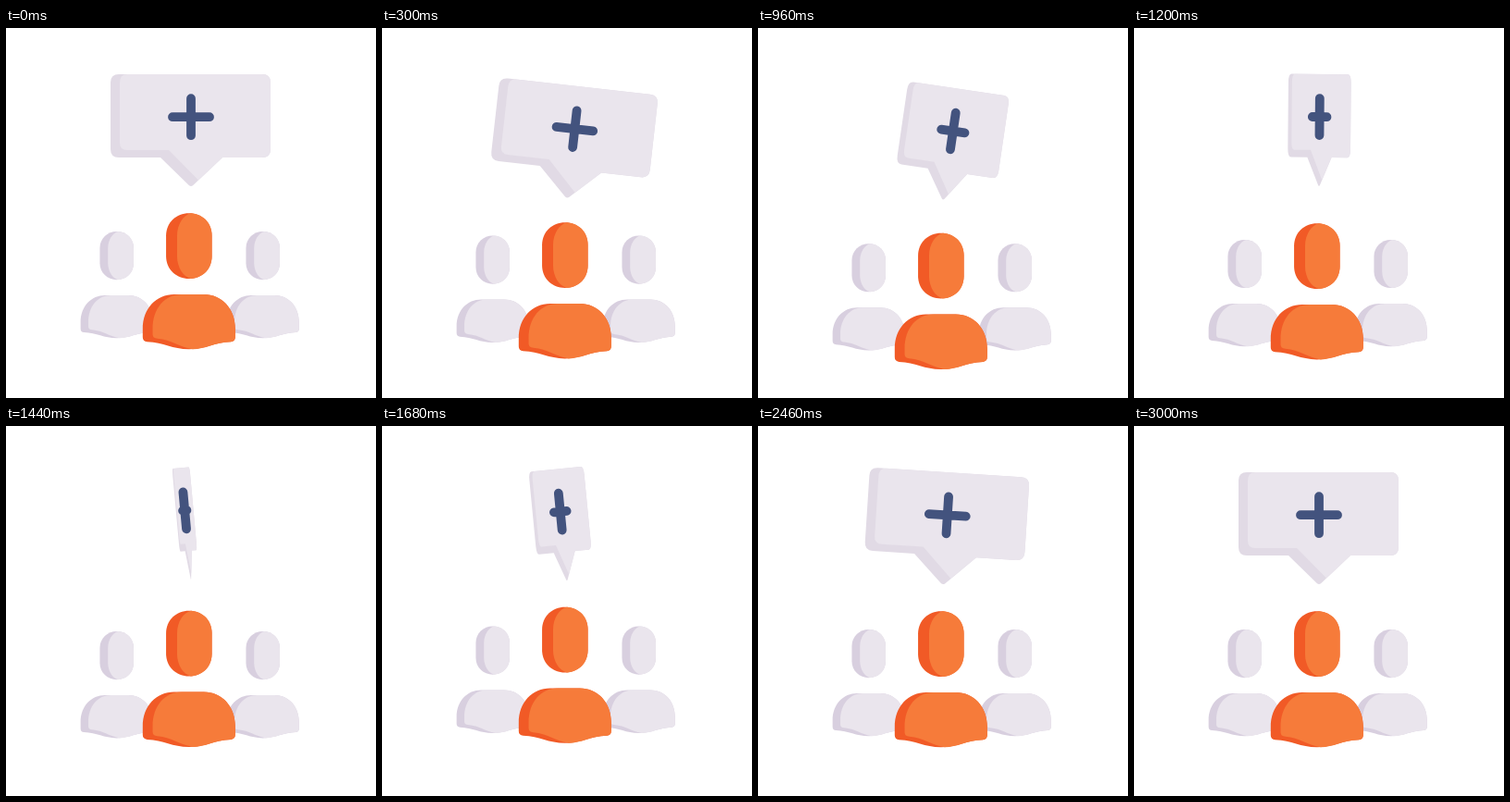
An HTML page with a canvas that plays this animation: 400 px wide and 400 px high, repeating every 4.59 s.

```html
<!DOCTYPE html>
<html lang="en">
<head>
<meta charset="utf-8">
<title>Team bubble</title>
<style>
  html, body { margin: 0; width: 100%; height: 100%; overflow: hidden; background: #fff; }
  canvas { display: block; width: 100vmin; height: 100vmin; margin: 0 auto; }
</style>
</head>
<body>
<canvas id="stage" width="400" height="400"></canvas>
<script>
const ctx = document.getElementById('stage').getContext('2d');
const LOOP = 4590, STEP = 30, END = 3000;

const ORANGE = { light: '#f67b3a', dark: '#f15a26' };
const GREY = { light: '#eae5ed', dark: '#d8cfdf' };
const BUBBLE = { light: '#eae5ed', dark: '#e1dae5' };
const NAVY = '#43537e';

// Eases by sine from zero through a few [time, value] turning points.
function sway(t, ...points) {
  let t0 = 0, v0 = 0;
  for (const [t1, v1] of points) {
    if (t < t1) return v0 + (v1 - v0) * (1 - Math.cos(Math.PI * (t - t0) / (t1 - t0))) / 2;
    [t0, v0] = [t1, v1];
  }
  return v0;
}

// The bubble turns edge-on at 1530 ms, then opens faster than it closed.
function turn(t) {
  const edge = 1530, span = t < edge ? 1290 : 670;
  return Math.sin(Math.PI / 2 * Math.min(1, Math.abs(t - edge) / span));
}

// Shapes are centred on x = 0; heads and bodies start at y = 0, the bubble tip is the origin.
const head = {
  base: new Path2D('M-24.5 24 C-24.5 10 -13.5 0 0 0 S24.5 10 24.5 24 V46 C24.5 60 13.5 70 0 70 S-24.5 60 -24.5 46Z'),
  face: new Path2D('M2 0 C16 1 24.5 11 24.5 24 V46 C24.5 59 16 69 2 70 C-6 68 -12.7 58 -12.7 46 V24 C-12.7 12 -6 2 2 0Z')
};
const body = {
  base: new Path2D('M-49.7 37 C-49.7 15 -35 0 -16 0 H16 C35 0 49.7 15 49.7 37 V46 Q49.7 50.5 45 51 C27 51.5 18 59 0 59 S-27 51.5 -45 51 Q-49.7 50.5 -49.7 46Z'),
  face: new Path2D('M-8 0 H16 C35 0 49.7 15 49.7 37 V46 Q49.7 50.5 45 51 C27 51.5 18 59 4 59 C-12 56 -18 49 -34 47.5 Q-39 47 -39 43 V37 C-39 15 -26 0 -8 0Z')
};
const bubble = {
  base: new Path2D('M-78 -121 H77 Q86 -121 86 -112 V-40 Q86 -31 77 -31 H34 L2 -.7 Q0 .6 -2 -.7 L-33 -31 H-78 Q-87 -31 -87 -40 V-112 Q-87 -121 -78 -121Z'),
  face: new Path2D('M-69 -121 H77 Q86 -121 86 -112 V-40 Q86 -31 77 -31 H34 L8 -6.5 L-24 -39 H-69 Q-77 -39 -77 -47 V-112 Q-77 -121 -69 -121Z')
};

function drawShape(shape, colors, x, y, sx, sy = sx) {
  ctx.save();
  ctx.translate(x, y);
  ctx.scale(sx, sy);
  ctx.fillStyle = colors.dark;
  ctx.fill(shape.base);
  ctx.fillStyle = colors.light;
  ctx.fill(shape.face);
  ctx.restore();
}

function drawPerson(colors, x, headY, bodyY, headScale, bodyScale) {
  drawShape(head, colors, x, headY, headScale);
  drawShape(body, colors, x, bodyY, bodyScale);
}

function drawBubble(drop, tilt, width) {
  ctx.save();
  ctx.translate(200, 171 + drop);
  ctx.rotate(tilt * Math.PI / 180);
  drawShape(bubble, BUBBLE, 0, 0, width, 1);
  // The stroke keeps its thickness while the bubble narrows.
  const arm = 20 * width;
  ctx.translate(0, -74.8);
  ctx.strokeStyle = NAVY;
  ctx.lineWidth = 9.8;
  ctx.lineCap = 'round';
  ctx.beginPath();
  ctx.moveTo(-arm, 0);
  ctx.lineTo(arm, 0);
  ctx.moveTo(0, -20);
  ctx.lineTo(0, 20);
  ctx.stroke();
  ctx.restore();
}

function draw(t) {
  const leader = sway(t, [670, 24], [800, 24], [1650, -4.5], [2460, 0]);
  const team = sway(t, [760, 13.5], [880, 13.5], [1830, -4.5], [2460, 0]);
  const drop = sway(t, [630, 27], [1400, -5.2], [2250, 0]);
  const tilt = sway(t, [630, 13.9], [1560, -6], [2430, 3.7], [END, 0]);

  ctx.fillStyle = '#fff';
  ctx.fillRect(0, 0, 400, 400);
  for (const x of [119.7, 277.7]) drawPerson(GREY, x, 220 + team, 289 + team, 0.745, 0.786);
  drawPerson(ORANGE, 197.8, 200.2 + leader, 288 + leader, 1.01, 1.006);
  drawBubble(drop, tilt, turn(t));
}

const start = performance.now();
function tick() {
  const t = (performance.now() - start) % LOOP;
  draw(Math.min(END, Math.floor(t / STEP) * STEP));
  requestAnimationFrame(tick);
}
tick();
</script>
</body>
</html>
```
